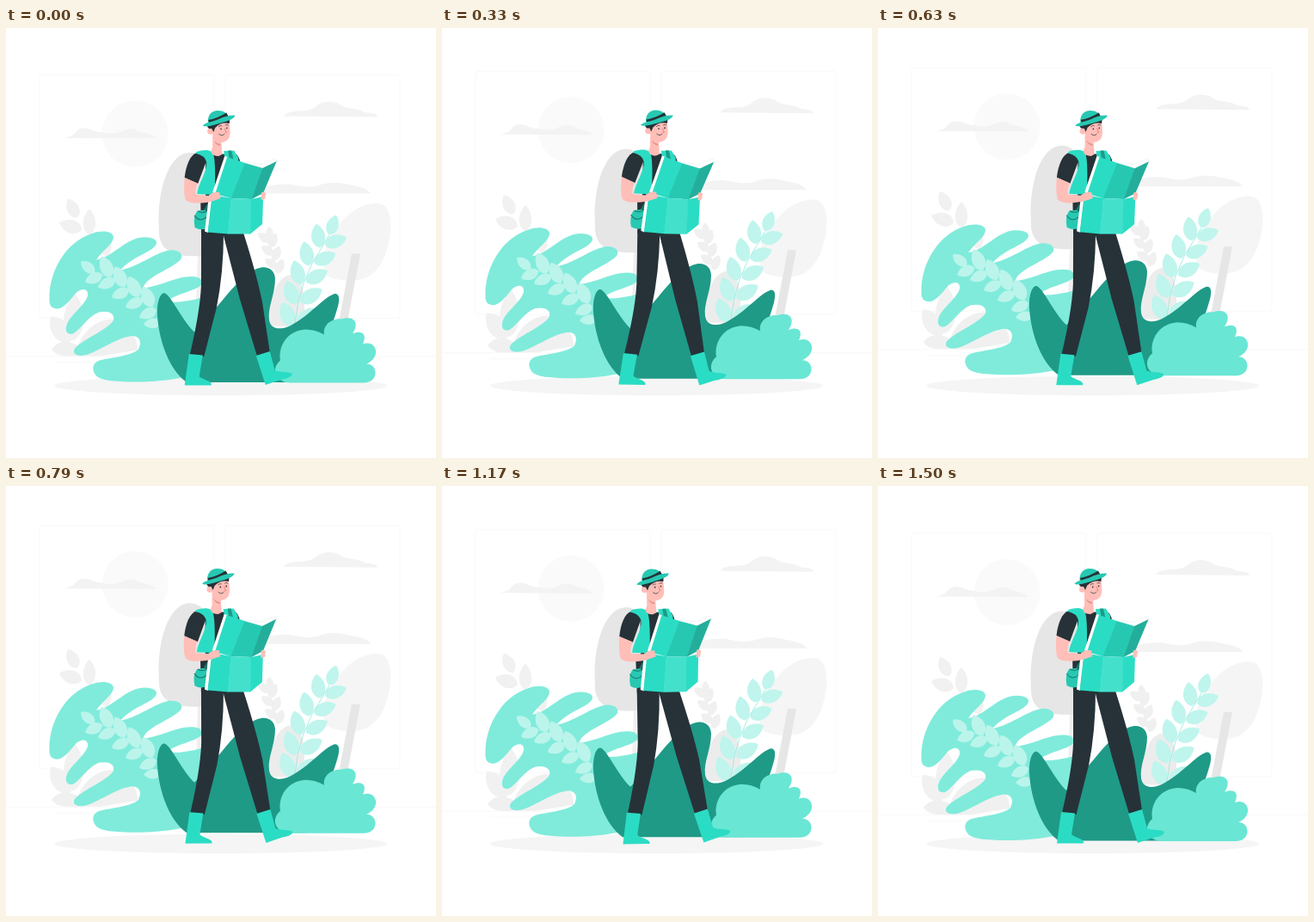
These frames come from a looping animation (500 by 500 pixels, 1.54 s). An HTML page:

```html
<!DOCTYPE html>
<html lang="en">
<head>
<meta charset="utf-8">
<title>Hiker with a map</title>
<style>
  html, body { margin: 0; width: 100%; height: 100%; overflow: hidden; background: #fff; }
  svg { display: block; width: 100%; height: 100%; }
  .teal { fill: #2bdcc4 }
  .mid { fill: #27c8b2 }
  .deep { fill: #1f9a87 }
  .ink { fill: #263238 }
  .skin { fill: #ffbeb8 }
</style>
</head>
<body>
<svg viewBox="0 0 500 500">
  <ellipse cx="249.500" cy="416" rx="193.500" ry="11.300" fill="#f5f5f5"/>

  <g id="scene">
    <g fill="none" stroke="#f9f9f9">
      <rect x="39" y="55" width="203" height="283" rx="3"/>
      <rect x="255" y="55" width="203" height="283" rx="3"/>
      <path d="M0 382.500H500M56 389.500H105" stroke="#f5f5f5" stroke-width=".6"/>
    </g>
    <circle cx="150" cy="123.500" r="38.500" fill="#fafafa"/>
    <g fill="#f3f3f3">
      <path d="M67 128.500Q75 127 79 124Q86 113 100 119Q106 122 113 122Q125 125 134 121Q146 114 157 122Q170 123 175 129Z"/>
      <path d="M323 103Q327 97 342 97Q355 97 361 91Q372 83 386 88Q392 93 402 94Q412 95 418 99Q431 99 432 104Z"/>
      <path d="M290 193Q300 181 330 182Q350 187 362 184Q380 177 400 183Q420 186 424 193Z"/>
    </g>

    <path d="M223 262H227L225 382H219Z" fill="#f0f0f0"/>
    <path d="M177.500 222C178 180 192 147 212 145.500C230 144 243 165 246 200C248 240 243 260 228 265.500C203 267 180 264 178 240Z" fill="#e6e6e6"/>
    <path d="M447 225C446 208 438 203 427 204.500C408 206 392 222 384 234C370 250 366 275 372 287C380 294 400 296 412 293C440 288 449 245 447 225Z" fill="#f5f5f5"/>
    <path d="M402 263H412L397 342H387Z" fill="#e6e6e6"/>

    <g id="weeds" fill="#f1f1f1"></g>
    <path d="M53 374C62 362 75 365 84 370C90 350 112 336 128 340C142 348 154 360 153 375L110 382H68C60 381 56 378 53 374Z" fill="#f0f0f0"/>
    <path d="M304 347C306 306 318 288 333 287C346 290 350 320 345 348Z" fill="#ececec"/>
    <g id="pale" fill="#f0f0f0" stroke="#f0f0f0"></g>

    <path fill="#80ebdb" d="M50.500 315C50 285 68 250 100 239.500C112 235 125 237 125 244C124 253 113 258 105 270C124 267 138 246 158 244C168 243 176 246 175 251C172 261 148 265 133 282C152 279 175 261 190 259C199 258 206 262 204 268C200 278 160 290 160 303C178 301 200 289 215 289.500C225 289 229 293 227 299C222 306 198 309 186 319C200 320 214 318 228 314L226 404C204 406 190 412 150 412C125 412 110 410 105 405C98 396 102 389 109 387C125 383 146 382 154 374C158 366 156 359 147 358.500C130 360 110 375 95 380C83 384 76 379 80 373C90 362 121 350 125 340C127 332 118 329 108 331C95 336 88 350 78 356C69 358 68 350 72 342C78 332 92 322 95 312C96 303 88 303 82 308C75 316 68 326 60 327C52 327 50 322 50.500 315Z"/>
    <g id="left" fill="#bbf4eb" stroke="#bbf4eb"></g>
    <g id="right" fill="#bff5ed" stroke="#8cebdc"></g>

    <path class="deep" d="M210 412.500C190 398 178 365 176 335C175 318 180 307 185 309C193 313 203 338 219 354C240 335 260 302 282 286C298 274 312 278 313 292C313 310 304 325 306 340C308 351 318 352 330 347C352 336 370 313 382 309.500C388 309 388 316 386 324Q376 360 350 412.500Z"/>
    <path fill="#69e6d4" d="M330 413C312 412 308 396 319 387C316 370 328 352 348 351Q360 351 370 357C368 345 380 338 390 339C401 335 413 340 403 356C412 352 421 355 415 368C430 362 438 383 419 391C433 391 434 413 416 413Z"/>
  </g>

  <g id="hiker">
    <g class="ink">
      <path d="M252 238H276Q291 285 298 318L307 377L292 381L272 315Z"/>
      <path d="M227 236L253 238Q253 285 245 325L230.500 382L214 380Q228 320 227 290Z"/>
      <path d="M226 195H246V240H227ZM232 146L268 147Q273 153 272 160L245 200H232Z"/>
      <path d="M207.500 174C209 160 214 147 222 145L236 146L223 181Z"/>
    </g>
    <g class="teal">
      <path d="M213 379L229 380.500L225 405C228 409 241 410 239 415.500H208Z"/>
      <path d="M291 381L307 376L313 398C320 401 328 399 333 402C333 406 326 408 320 409L302 415Z"/>
      <path d="M221 144C230 141 239 141 241 147Q244 158 242.500 194L222 193C223 182 234 167 233 156Q231 148 221 146Z"/>
      <path d="M253 143L265 142.500L270 151V158H255Z"/>
    </g>
    <path class="deep" d="M258 142.500H262L265 156H260Z"/>

    <path class="skin" d="M240 120V139C236 145 240 149 247 149L251 147L250 130Z"/>
    <path d="M242 131Q245 135 249 135V137Q243 136 242 131Z" fill="#e58f8a"/>
    <path class="skin" d="M241 114L259 109C260 115 261.500 123 259 128C256 133 249 134 246 132C242 129 240 124 241 114Z"/>
    <circle class="skin" cx="237.700" cy="120" r="3.800"/>
    <path class="ink" d="M233.800 112L260 105L259.500 111Q250 109 243 116L241 121L239 117H236Q233 115 233.800 112Z"/>
    <path d="M249.700 117.300V117.600M256.600 116.300V116.600" stroke="#263238" stroke-width="1.600" stroke-linecap="round"/>
    <g fill="none" stroke="#263238" stroke-width=".7" stroke-linecap="round">
      <path d="M247 114.800Q248.500 113 250.500 113.700M255 113Q257 111.700 258.300 113M247.500 123.500Q251 126.500 253.500 123.500"/>
      <path d="M254 117L256 121.500L254.500 122" stroke="#e06e68"/>
    </g>
    <path class="mid" d="M234.500 110C234 101 239 96 246 96S257 99 259 105Z"/>
    <path class="ink" d="M235 107Q246 105 256 98.500L259 104L236 111Z"/>
    <path class="mid" d="M228.500 113.500C233 109 241 109 247 106Q257 101 266 101.500C266 106 255 109 246 111.500Q231 116 228.500 113.500Z"/>

    <path d="M238 201L230 214M239 204L234 216" stroke="#1b7568" stroke-width="3"/>
    <path class="mid" d="M222 213Q233 210 235 215L234 233Q226 236 219.500 232Q217 220 222 213Z"/>
    <path d="M219 218Q226 228 235 218M223 213Q228 216 234 213" fill="none" stroke="#1b7568"/>

    <path d="M278 156L298 158L313 151.500L315 155L298 164Z" fill="#fff" stroke="#e6eeee" stroke-width=".6"/>
    <path d="M254 149L257.500 150L244 193L240 191ZM236 194L240 195L235 238L231 236.500Z" fill="#fff"/>
    <path class="teal" d="M257 150L278 157L262 198L243 193ZM239.500 194L262 198L258.500 239.500L234.500 237.500Z"/>
    <path class="mid" d="M277.500 157L298.500 163L286 199L261.500 198Z"/>
    <path fill="#23ae9b" d="M298 163L314.500 155L299 192L285.500 199Z"/>
    <path fill="#43e1cc" d="M261.500 198L285.500 199L284.500 239.500H258Z"/>
    <path class="teal" d="M285 199L299 196L298 228L284 239.500Z"/>

    <path class="skin" d="M207.500 174L222.500 180.500Q219 191 221 194L236 195Q240 190 248 191L249.500 198L238 202C227 204 214 205 209 200Q206 194 207.500 174Z"/>
    <path class="skin" d="M297 191Q302 190 302 193L301 199L296.500 200Z"/>
  </g>
</svg>
<script>
  const $ = id => document.getElementById(id);

  // A leaf growing from (x, y) by (u, v); w sets how wide it bulges.
  function leaf(x, y, u, v, w = .38) {
    const at = (k, s) => `${x + u * k - s * v * w} ${y + v * k + s * u * w}`;
    const end = `${x + u} ${y + v}`;
    return `M${x} ${y}C${at(.15, 1)} ${at(.7, 1)} ${end}C${at(.7, -1)} ${at(.15, -1)} ${x} ${y}Z`;
  }

  // Pairs of leaves on a stem that bends by a constant amount per node.
  function sprig(id, { x, y, step, bend, count, tip, a, b, gap, turn }) {
    let leaves = leaf(x + tip[0], y + tip[1], tip[2], tip[3]);
    let stem = `M${x + tip[0]} ${y + tip[1]}`;
    for (let i = 0; i < count; i++) {
      const nx = x + step[0] * i + bend[0] * i * i;
      const ny = y + step[1] * i + bend[1] * i * i;
      leaves += leaf(nx, ny, a[0] - turn * i, a[1]);
      leaves += leaf(nx + gap[0], ny + gap[1], b[0], b[1] - turn * i);
      stem += `L${nx + gap[0] / 2} ${ny + gap[1] / 2}`;
    }
    $(id).innerHTML = `<path d="${leaves}" stroke="none"/>` +
      `<path d="${stem}" fill="none" stroke-width=".8"/>`;
  }

  sprig('left', {
    x: 122, y: 290, step: [16, 11.7], bend: [0, 0], count: 4, turn: 0,
    tip: [-19, -5, -16, -13], a: [-11, -24], b: [-20, 9], gap: [5, 3]
  });
  $('left').innerHTML += `<path d="${leaf(112, 287, -20, 9) + leaf(180, 343, -20, 2)}" stroke="none"/>`;

  sprig('right', {
    x: 365, y: 256, step: [-14, 20], bend: [1.5, .7], count: 5, turn: 2,
    tip: [11, -15, 8, -23], a: [-4, -28], b: [25, -9], gap: [6, -3]
  });

  sprig('pale', {
    x: 307, y: 249, step: [4, 15], bend: [0, 0], count: 3, turn: 0,
    tip: [0, -3, -1, -15], a: [-14, -10], b: [7, -17], gap: [0, 7]
  });

  $('weeds').innerHTML = `<path d="${
    leaf(83, 221, -11, -22) + leaf(97, 241, 0, -30, .32) + leaf(88, 235, -26, -8) +
    leaf(117, 266, -5, -29, .35) + leaf(78, 364, 2, -55, .28) + leaf(75, 366, -23, -30)
  }"/>`;

  const LOOP = 1540, STEPS = 37, STEP = 1000 / 24;
  const wave = p => 1 - Math.abs(1 - 2 * (p % 1));

  function draw(ms) {
    const step = Math.min(STEPS - 1, Math.floor((ms % LOOP + 5) / STEP));
    const p = (step + 1) / STEPS;
    $('scene').setAttribute('transform', `translate(0 ${-10 * wave(p)})`);
    $('hiker').setAttribute('transform', `rotate(${2 * wave(p + .25) - 1} 270 256)`);
  }

  const start = performance.now();
  function tick() {
    draw(performance.now() - start);
    requestAnimationFrame(tick);
  }
  tick();
</script>
</body>
</html>
```
